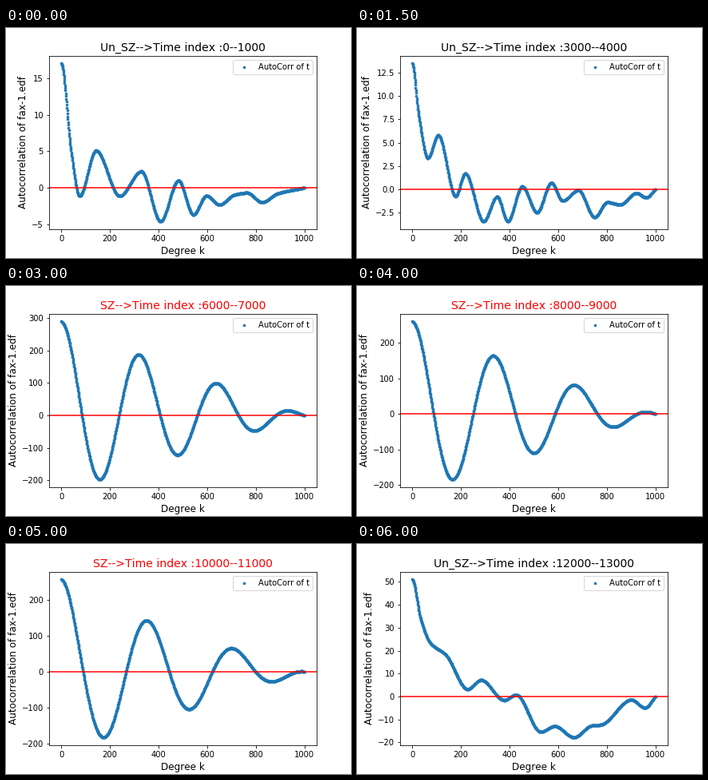
Write a matplotlib script that moves like this. It is 432 px wide and 288 px high and loops after 6500 ms.

```python
import numpy as np
import matplotlib.pyplot as plt
from matplotlib.animation import FuncAnimation

plt.rcParams["font.family"] = "DejaVu Sans"
plt.rcParams["text.kerning_factor"] = 6  # whole-pixel letter spacing

STEP_MS = 500
WINDOW = 1000
FRAMES = 13
SEIZURE = range(4, 11)  # windows labelled SZ
K = np.arange(WINDOW + 1)


def ease(*points):
    """Smooth curve through (k, value) points, level at every turning point."""
    x, y = np.array(points, float).T
    h = np.diff(x)
    d = np.diff(y) / h
    m = np.zeros(len(x))
    same = d[:-1] * d[1:] > 0
    m[1:-1][same] = 2 / (1 / d[:-1][same] + 1 / d[1:][same])
    m[-1] = d[-1]
    i = np.clip(np.searchsorted(x, K, side="right") - 1, 0, len(h) - 1)
    t = (K - x[i]) / h[i]
    s = t * t * (3 - 2 * t)
    bend = t * (1 - t) * ((1 - t) * m[i] - t * m[i + 1])
    return y[i] + s * (y[i + 1] - y[i]) + h[i] * bend


def rhythm(window):
    """Autocorrelation of a steady oscillation: a cosine fading linearly with lag."""
    def at(*values):
        return np.interp(window, (6, 8, 10), values)

    period = at(322, 337, 355)
    start, peak, trough = at(289, 260, 256), at(276, 246, 220), at(234, 221, 222)
    swing = (peak + trough) / 2 * np.cos(2 * np.pi * K / period)
    core = (start - peak) * np.exp(-(K / 60) ** 2)
    return (1 - K / WINDOW) * (swing + (peak - trough) / 2) + core


def mix(a, b, w, gain=1.0):
    return gain * ((1 - w) * a + w * b)


# Turning points of the irregular windows
calm_a = ease(
    (0, 17.05), (40, 5.1), (75, -1.15), (143, 5.1), (240, -1.15), (329, 2.25),
    (408, -4.62), (482, 1), (543, -3.7), (597, -1.1), (651, -2.35), (710, -1),
    (765, -0.7), (825, -2), (890, -0.8), (1000, 0))
calm_b = ease(
    (0, 13.5), (25, 8.2), (64, 3.35), (107, 5.8), (178, -0.75), (218, 1.7),
    (293, -3.45), (349, -0.8), (393, -3.45), (452, 0.3), (513, -2.5),
    (572, 0.7), (618, -1.25), (683, -0.1), (750, -3), (802, -1.4),
    (855, -1.65), (922, -0.4), (962, -0.9), (1000, 0))
onset = ease(
    (0, 280), (60, 112), (121, -2), (226, 126), (366, -69), (475, -23),
    (545, -57), (647, -75.5), (807, -27), (892, -31), (1000, -1))
recovery = ease(
    (0, 51), (34, 34), (73, 23.5), (139, 18), (227, 3.2), (283, 7.2),
    (378, -1.6), (427, 0.8), (528, -15.4), (586, -12.9), (665, -17.8),
    (737, -12.7), (776, -12.3), (901, -1.4), (957, -4.9), (1000, 0))

CURVES = [
    calm_a,
    mix(calm_a, calm_b, 0.33, 1.16),
    mix(calm_a, calm_b, 0.62, 1.12),
    calm_b,
    onset,
    mix(onset, rhythm(6), 0.7),
    *(rhythm(i) for i in range(6, 11)),
    mix(recovery, rhythm(10), 0.08),
    recovery,
]

fig, ax = plt.subplots(figsize=(6, 4), dpi=72)
fig.subplots_adjust(left=0.125, right=0.9, bottom=0.125, top=0.88)
dots = ax.scatter(K, CURVES[0], s=7, color="#1f77b4", label="AutoCorr of t")
ax.axhline(0, color="red", lw=1.5)
ax.set_xlim(-0.05 * WINDOW, 1.05 * WINDOW)
ax.set_xlabel("Degree k", fontsize=12)
ax.set_ylabel("Autocorrelation of fax-1.edf", fontsize=12)
ax.legend(loc="upper right", fontsize=10)


def draw(i):
    y = CURVES[i]
    dots.set_offsets(np.column_stack([K, y]))
    pad = 0.05 * np.ptp(y)
    ax.set_ylim(y.min() - pad, y.max() + pad)
    name, color = ("SZ", "red") if i in SEIZURE else ("Un_SZ", "black")
    start = i * WINDOW
    ax.set_title(f"{name}-->Time index :{start}--{start + WINDOW}",
                 fontsize=14, color=color)
    return dots,


anim = FuncAnimation(fig, draw, frames=FRAMES, interval=STEP_MS, repeat=True)
plt.show()
```
